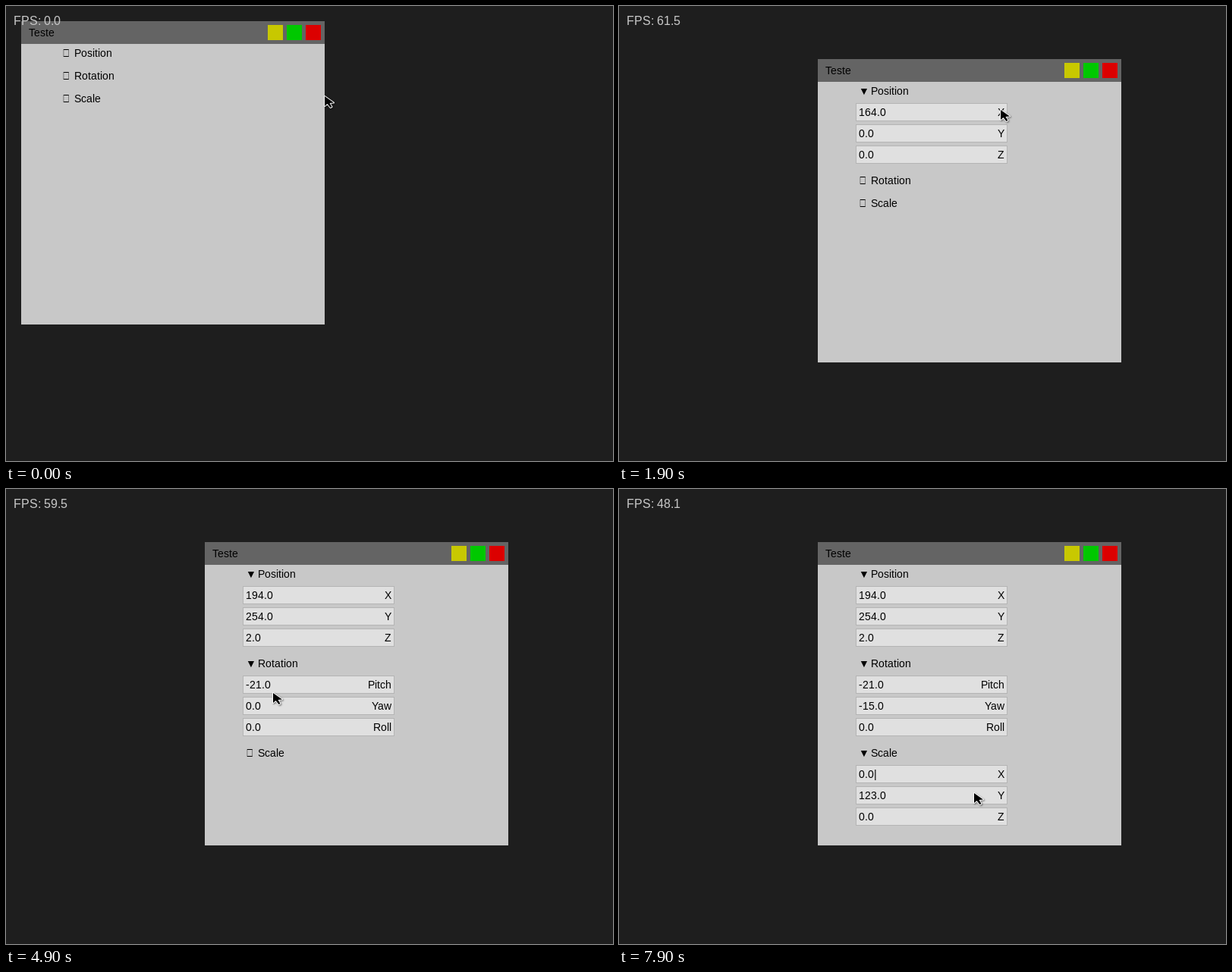
Animation of 800x600 px, one loop 8000 ms. Source, as an HTML page with a canvas:

```html
<!DOCTYPE html>
<html>
<head>
<meta charset="utf-8">
<style>
  html, body { margin: 0; width: 100%; height: 100%; overflow: hidden; background: #1e1e1e; }
  canvas { display: block; }
</style>
</head>
<body>
<canvas id="stage" width="800" height="600"></canvas>
<script>
const ctx = document.getElementById('stage').getContext('2d');
const LOOP = 8000, STEP = 100;
const FONT = '"Liberation Sans", sans-serif';
const HOME = { x: 20, y: 20 }, DOCK = { x: 262, y: 70 };

const clamp01 = v => Math.max(0, Math.min(1, v));
const smooth = k => k * k * (3 - 2 * k);
const mix = (a, b, k) => a + (b - a) * k;
const progress = (a, step) => clamp01((step - a.at) / (a.end - a.at));

// Pointer actions; times are in steps
function rest(at, x, y, end = at) {
  return { at, end, pose: () => [x, y] };
}

// Horizontal scrub of the field centred on mid; swing is the overshoot before settling
function scrub(at, end, x, mid, value, swing = 0) {
  const a = { at, end, hold: 1 };
  a.value = step => {
    const k = smooth(progress(a, step));
    return Math.round(value * k + swing * Math.sin(Math.PI * k));
  };
  a.pose = step => [x + a.value(step), mid - 5];
  return a;
}

const move = { at: 2, end: 6, hold: 1 };
move.origin = step => {
  const k = progress(move, step);
  return [
    Math.round(mix(HOME.x, DOCK.x, k ** 0.67)),
    Math.round(mix(HOME.y, DOCK.y, k ** 1.4))
  ];
};
move.pose = step => {
  const [x, y] = move.origin(step);
  return [x + 244, y + 22];
};

const posX = scrub(16, 20, 338, 140, 194);
const posY = scrub(24, 28, 323, 168, 254);
const posZ = scrub(32, 37, 337, 196, 2, 192);
const pitch = scrub(42, 47, 365, 258, -21, 210);
const yaw = scrub(50, 55, 358, 286, -15, 180);
const scaleY = scrub(73, 79, 344, 404, 123);

const ACTIONS = [
  rest(0, 419, 117), move, rest(10, 318, 121), rest(13, 330, 113), posX, posY,
  rest(30, 380, 176), posZ, rest(40, 355, 227), pitch, yaw,
  rest(58, 343, 306), rest(62, 335, 346), rest(67, 456, 386, 69), scaleY
];

const GROUPS = [
  { name: 'Position', open: 13, labels: ['X', 'Y', 'Z'], scrubs: [posX, posY, posZ] },
  { name: 'Rotation', open: 40, labels: ['Pitch', 'Yaw', 'Roll'], scrubs: [pitch, yaw] },
  { name: 'Scale', open: 62, labels: ['X', 'Y', 'Z'], scrubs: [, scaleY], caret: 67 }
];

// Frame rate: key readings with jitter in between
const RATES = [[0, 0], [2, 57.1], [4, 57.1], [10, 62.1], [30, 62.1], [40, 60.2], [58, 61.7], [74, 61], [78, 48.1]];

function frameRate(step) {
  const t = step - step % 2;
  const i = Math.max(1, RATES.findIndex(r => r[0] >= t));
  const [t0, v0] = RATES[i - 1], [t1, v1] = RATES[i];
  const k = (t - t0) / (t1 - t0);
  return mix(v0, v1, k) + 1.5 * Math.sin(t * t) * Math.sin(Math.PI * k);
}

function pointer(step) {
  const i = ACTIONS.findLastIndex(a => a.at <= step);
  const a = ACTIONS[i], next = ACTIONS[i + 1];
  const free = a.end + (a.hold || 0);
  if (step <= free || !next) return a.pose(step);
  const k = smooth((step - free) / (next.at - free));
  const from = a.pose(free), to = next.pose(next.at);
  return from.map((v, j) => Math.round(mix(v, to[j], k)));
}

function rect(x, y, w, h, color) {
  ctx.fillStyle = color;
  ctx.fillRect(x, y, w, h);
}

// Kerned text set with whole-pixel advances
function text(str, x, y, { color = '#000', size = 14, right = false } = {}) {
  ctx.font = `${size}px ${FONT}`;
  ctx.fillStyle = color;
  const width = s => ctx.measureText(s).width;
  const chars = [...str];
  const advances = chars.map((c, i) => {
    const next = chars[i + 1] || '';
    return Math.round(width(c + next) - width(next));
  });
  if (right) x -= advances.reduce((a, b) => a + b);
  chars.forEach((c, i) => {
    ctx.fillText(c, x, y);
    x += advances[i];
  });
}

function field(x, y, value, label) {
  rect(x, y, 200, 24, '#b4b4b4');
  rect(x + 1, y + 1, 198, 22, '#e0e0e0');
  text(value, x + 4, y + 17);
  text(label, x + 196, y + 17, { right: true });
}

function closedMark(x, y) {
  for (const dy of [0, 9]) rect(x, y + dy, 7, 1, '#000');
  for (const dx of [0, 6.6]) rect(x + dx, y + 1, 0.4, 8, '#000');
}

function panel(step) {
  const [x, y] = move.origin(step);
  rect(x, y, 400, 400, '#c8c8c8');
  rect(x, y, 400, 30, '#646464');
  text('Teste', x + 10, y + 20);
  ['#c8c800', '#00c800', '#dc0000'].forEach((c, i) => rect(x + 325 + i * 25, y + 5, 20, 20, c));

  let mid = y + 42;
  for (const g of GROUPS) {
    text(g.name, x + 70, mid + 5);
    if (step >= g.open) {
      text('▼', x + 54, mid + 5);
      g.labels.forEach((label, i) => {
        const s = g.scrubs[i];
        const caret = i === 0 && step >= g.caret ? '|' : '';
        const value = (s ? s.value(step) : 0).toFixed(1) + caret;
        field(x + 50, mid + 16 + i * 28, value, label);
      });
      mid += 88;
    } else {
      closedMark(x + 55.75, mid - 5);
    }
    mid += 30;
  }
}

function arrow(x, y) {
  ctx.save();
  ctx.translate(x, y);
  ctx.beginPath();
  ctx.moveTo(1, 2);
  for (const [px, py] of [[1, 15], [4.5, 12], [8.5, 17], [10.5, 16], [7.5, 11], [13, 10.5]]) ctx.lineTo(px, py);
  ctx.closePath();
  ctx.lineWidth = 2;
  ctx.lineJoin = 'round';
  ctx.strokeStyle = '#fff';
  ctx.shadowColor = 'rgba(0,0,0,0.5)';
  ctx.shadowBlur = 2;
  ctx.shadowOffsetX = ctx.shadowOffsetY = 1;
  ctx.stroke();
  ctx.shadowColor = 'transparent';
  ctx.fillStyle = '#000';
  ctx.fill();
  ctx.restore();
}

function draw(now) {
  const step = Math.floor((now % LOOP) / STEP);
  rect(0, 0, 800, 600, '#1e1e1e');
  panel(step);
  text('FPS: ' + frameRate(step).toFixed(1), 10, 25, { color: '#c8c8c8', size: 16 });
  arrow(...pointer(step));
}

const start = performance.now();
function tick() {
  draw(performance.now() - start);
  requestAnimationFrame(tick);
}
tick();
</script>
</body>
</html>
```
